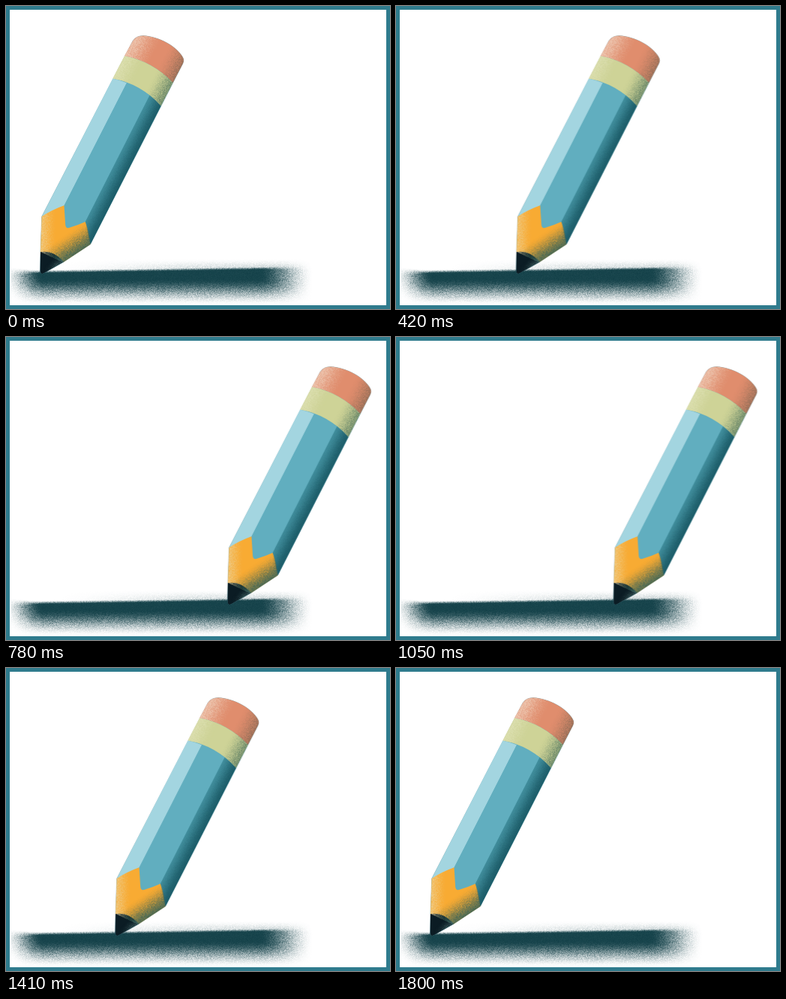
These frames come from a looping animation (512x403 px, 1830 ms). An HTML page with a canvas:

```html
<!DOCTYPE html>
<html lang="en">
<head>
<meta charset="utf-8">
<title>Pencil</title>
<style>
html, body { margin: 0; width: 100%; height: 100%; overflow: hidden; background: #fff; }
canvas { display: block; }
</style>
</head>
<body>
<canvas id="stage" width="512" height="403"></canvas>
<script>
const W = 512, H = 403;
const STEP = 30, LOOP = 1830, HALF = 900, TRAVEL = 259;
const ctx = document.getElementById('stage').getContext('2d');

let seed = 7;
const rnd = () => (seed = (seed * 1664525 + 1013904223) >>> 0) / 4294967296;
const clamp = v => Math.max(0, Math.min(1, v));
const smooth = (a, b, v) => { const t = clamp((v - a) / (b - a)); return t * t * (3 - 2 * t); };

function layer() {
  const c = document.createElement('canvas');
  c.width = W;
  c.height = H;
  return c;
}

// Speckled paint: density(x, y) gives the coverage, noise roughens the soft parts
function grain(g, box, rgb, density, rough, clip) {
  const [x0, y0, x1, y1] = box;
  const c = layer(), k = c.getContext('2d');
  const img = k.createImageData(x1 - x0, y1 - y0);
  let i = 0;
  for (let y = y0; y < y1; y++) {
    for (let x = x0; x < x1; x++, i += 4) {
      const d = density(x + 0.5, y + 0.5);
      const n = (rnd() + rnd() - 1) * rough * 4 * d * (1 - d);
      img.data[i] = rgb[0];
      img.data[i + 1] = rgb[1];
      img.data[i + 2] = rgb[2];
      img.data[i + 3] = 255 * clamp(d + n);
    }
  }
  k.putImageData(img, x0, y0);
  g.save();
  if (clip) g.clip(clip);
  g.drawImage(c, 0, 0);
  g.restore();
}

function fill(g, path, color) {
  g.fillStyle = color;
  g.fill(path);
}

function shadowDensity(x, y) {
  const top = 354.5 - x / 60;
  const ends = smooth(-2, 50, x + (365 - y) * 0.25) * (1 - smooth(338, 410, x));
  const soft = 5 * (1 - ends);
  const body = ends * smooth(top - 3 - soft, top + 2 + soft, y) * (1 - smooth(363, 398, y));
  const haze = 0.24 * smooth(60, 330, x) * (1 - smooth(365, 410, x)) *
    smooth(336, 354, y) * (1 - smooth(354, 370, y));
  return Math.max(body * 0.97, haze);
}

function drawScene() {
  const c = layer(), g = c.getContext('2d');
  g.fillStyle = '#fff';
  g.fillRect(0, 0, W, H);
  grain(g, [6, 332, 412, 397], [16, 62, 70], shadowDensity, 0.22);
  g.strokeStyle = '#2f7b8d';
  g.lineWidth = 5;
  g.strokeRect(2.5, 2.5, W - 5, H - 5);
  return c;
}

function drawPencil() {
  const c = layer(), g = c.getContext('2d');
  const path = d => new Path2D(d);
  const cap = 'L169 46.5Q173.5 39.6 183 39.6C204 40.8 228.5 54 236 69Q237.7 72.5 235.8 76.5';
  const outline = path('M47.7 280' + cap + 'L112.5 317L76 341L51 355Q46 358 45.5 352L46 327Z');
  const eraser = path('M158 66.5' + cap + 'L222.5 102Q195 73.3 158 66.5Z');
  const band = path('M158 66.5Q195 73.3 222.5 102L206.5 133Q180 103.3 142.3 96.5Z');
  const light = path('M142.3 96.5Q152 98.5 161 102.3L77.5 265.5L47.7 280Z');
  const mid = path('M161 102.3Q177 108.5 191.5 118.8L105.7 287Q96 291.5 84 295Q79.5 296 79.2 291L77.5 265.5Z');
  const dark = path('M191.5 118.8Q199 124.5 206.5 133L112.5 317L105.7 287Z');
  const wood = path('M47.7 280Q61 271 77.5 265.2L79.2 291Q79.5 296 84 295Q96 291.5 105.7 287Q111 301 112.5 317L76 341L46 327Z');
  const lead = path('M46 327Q64 324.5 77 340.3L51 355Q46 358 45.5 352Z');

  // across: 0 at the left edge, 74 at the right edge
  const across = (x, y) => (x - 48) * 0.889 + (y - 280) * 0.459;
  const under = (x, y) => (112 - x) * 0.555 + (317 - y) * 0.832;
  const all = [40, 34, 242, 360];

  g.lineWidth = 0.7;
  g.strokeStyle = 'rgba(40,75,85,.45)';
  g.stroke(outline);
  fill(g, outline, '#61aebf');
  fill(g, eraser, '#e08d6d');
  fill(g, band, '#ced397');
  fill(g, light, '#a3d5e0');
  fill(g, mid, '#61aebf');
  fill(g, dark, '#4391a0');
  fill(g, wood, '#f8ab33');
  fill(g, lead, '#0b1c24');

  grain(g, all, [240, 210, 190], (x, y) => 0.75 * (1 - smooth(-6, 36, across(x, y))), 0.28, eraser);
  grain(g, all, [125, 100, 80], (x, y) => 0.7 * smooth(46, 82, across(x, y)), 0.25, eraser);
  grain(g, all, [228, 230, 190], (x, y) => 0.55 * (1 - smooth(-4, 28, across(x, y))), 0.25, band);
  grain(g, all, [75, 112, 90], (x, y) => 0.75 * smooth(46, 82, across(x, y)), 0.25, band);
  grain(g, all, [24, 86, 98], (x, y) => 0.88 * smooth(50, 75, across(x, y)), 0.08, dark);
  grain(g, all, [235, 215, 165], (x, y) => 0.6 * (1 - smooth(42, 68, x)), 0.28, wood);
  grain(g, all, [55, 98, 88], (x, y) => 0.9 * (1 - smooth(-4, 30, under(x, y))), 0.22, wood);
  grain(g, all, [70, 105, 105], (x, y) => 0.6 * (1 - smooth(-2, 12, under(x, y))) * smooth(50, 70, x), 0.25, lead);
  return c;
}

// cubic-bezier(.42, 0, .58, 1)
function ease(p) {
  let s = p;
  for (let i = 0; i < 6; i++) {
    const x = s * (1.26 + s * (-0.78 + 0.52 * s));
    s -= (x - p) / (1.26 - 1.56 * s + 1.56 * s * s);
  }
  return s * s * (3 - 2 * s);
}

const scene = drawScene();
const pencil = drawPencil();
const start = performance.now();

function render() {
  const t = Math.floor(((performance.now() - start) % LOOP) / STEP) * STEP;
  const p = 1 - Math.abs(t - HALF) / HALF;
  ctx.drawImage(scene, 0, 0);
  ctx.drawImage(pencil, TRAVEL * ease(p), 0);
  requestAnimationFrame(render);
}
render();
</script>
</body>
</html>
```
